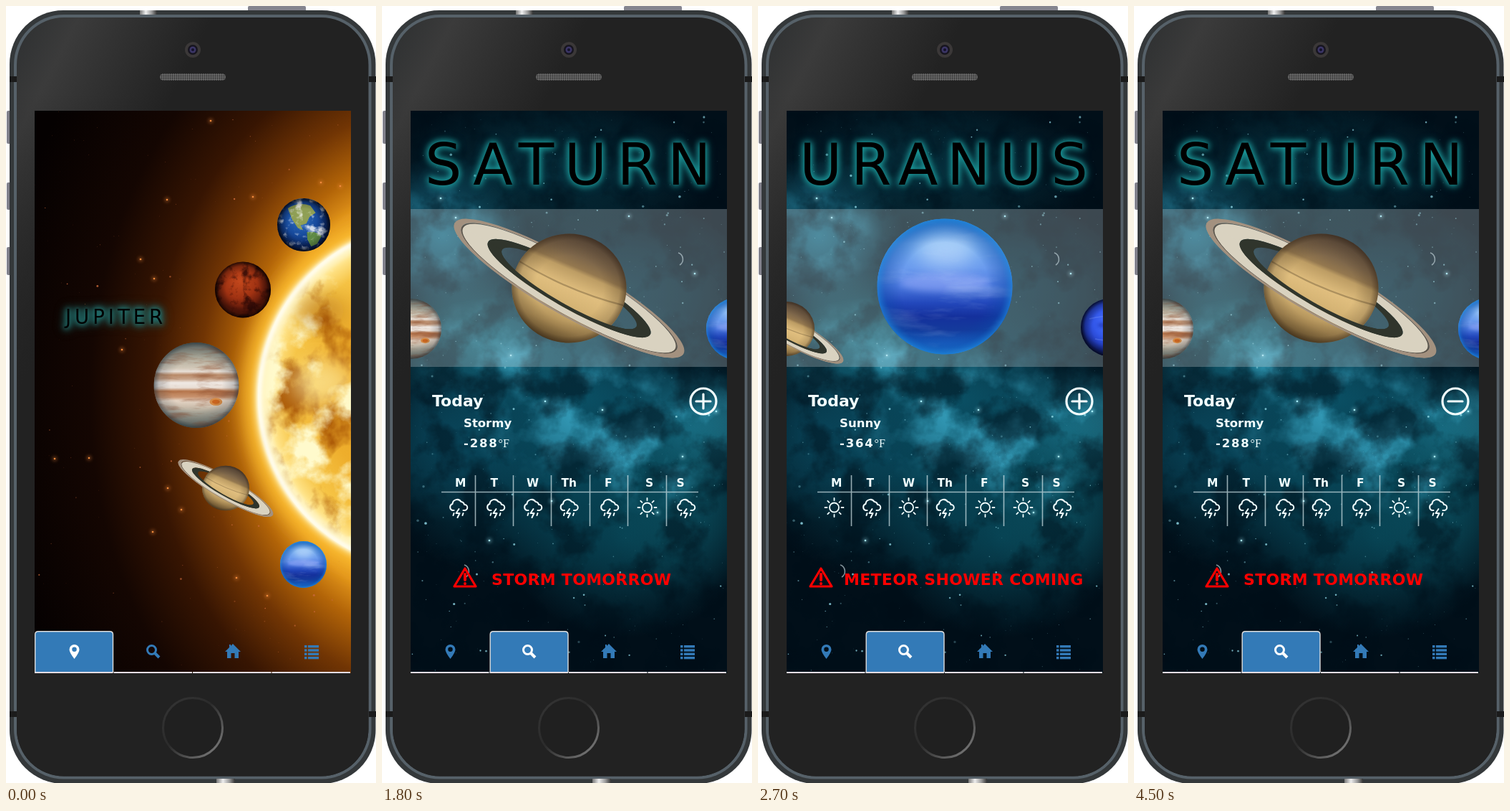
Animation of 517x1083 px, one loop 5.4 s. Source, as an HTML page:

```html
<!DOCTYPE html>
<html lang="en">
<head>
<meta charset="utf-8">
<title>Planet weather app</title>
<style>
  html, body { margin: 0; width: 100%; height: 100%; overflow: hidden; background: #fff; }
  svg { position: absolute; left: 0; top: 0; width: 517px; height: 1083px; }
  .layer { will-change: opacity; }
  text { font-family: "DejaVu Sans", sans-serif; fill: #f2ffff; white-space: pre; }
  .b { font-weight: bold; }
  .unit { font: 16px "Liberation Serif", serif; }
  .small { font-size: 27.5px; letter-spacing: 5px; fill: #000;
    filter: drop-shadow(0 0 3px #267f7c) drop-shadow(0 0 4px #1f6d6a) drop-shadow(0 0 6px #1c5d5b); }
  .large { font-size: 81px; fill: #000;
    filter: drop-shadow(0 0 5px #1fa3a3) drop-shadow(0 0 5px #137f83); }
  .alert { font-size: 22px; font-weight: bold; letter-spacing: .3px; fill: #f00; }
  .line { fill: none; stroke: #f2ffff; stroke-linecap: round; stroke-linejoin: round; }
</style>
</head>
<body>
<svg viewBox="0 0 517 1083" xmlns="http://www.w3.org/2000/svg">
  <defs id="defs"></defs>
  <g id="phone"></g>
</svg>
<div id="screen"></div>
<script>
const $ = id => document.getElementById(id);
const SLOTS = 6, LOOP = 5400;

let seed = 7;
const rnd = () => (seed = (seed * 16807) % 2147483647) / 2147483647;

// ---- gradients, filters ----
const stops = list => list.split(', ').map(s => {
  const [at, color, alpha = 1] = s.split(' ');
  return `<stop offset="${at}" stop-color="${color}" stop-opacity="${alpha}"/>`;
}).join('');
const lin = (id, list, attrs = 'x2="0" y2="1"') =>
  `<linearGradient id="${id}" ${attrs}>${stops(list)}</linearGradient>`;
const rad = (id, list, attrs = '') =>
  `<radialGradient id="${id}" ${attrs}>${stops(list)}</radialGradient>`;
const noise = (id, freq, rgb, gain, cut, n = 3) =>
  `<filter id="${id}" x="0" y="0" width="1" height="1" color-interpolation-filters="sRGB">
    <feTurbulence type="fractalNoise" baseFrequency="${freq}" numOctaves="5" seed="${n}"/>
    <feColorMatrix values="0 0 0 0 ${rgb[0]} 0 0 0 0 ${rgb[1]} 0 0 0 0 ${rgb[2]} ${gain} 0 0 0 ${-cut}"/>
  </filter>`;
const blur = (id, d) =>
  `<filter id="${id}" x="-.5" y="-.5" width="2" height="2"><feGaussianBlur stdDeviation="${d}"/></filter>`;

// ---- planets, drawn with a radius of 100 ----
const square = attrs => `<rect x="-100" y="-100" width="200" height="200" ${attrs}/>`;
const ball = (id, body, shade = 'shade') =>
  `<g id="${id}"><g clip-path="url(#ball)">${body}</g><circle r="100" fill="url(#${shade})"/></g>`;
const rings = [[223, 14, '#a3917f'], [214, 3, '#5d554b'], [188, 50, '#d9d2c0'], [149, 28, '#30352c']]
  .map(([r, w, c]) => `<circle r="${r}" stroke="${c}" stroke-width="${w}"/>`).join('');
const ringPlane = 'transform="rotate(29.7) scale(1 .205)" fill="none"';

$('defs').innerHTML =
  '<clipPath id="glass"><rect x="40" y="146" width="442" height="784"/></clipPath>' +
  '<clipPath id="ball"><circle r="100"/></clipPath>' +
  '<clipPath id="front"><rect x="-240" width="480" height="240"/></clipPath>' +
  '<clipPath id="disc"><circle cx="593" cy="545" r="241"/></clipPath>' +
  rad('shade', '.6 #000 0, .85 #000 .25, 1 #000 .75') +
  rad('soft', '.6 #123 0, .88 #123 .2, 1 #0a1c28 .55') +
  rad('dusk', '.6 #2a1c10 0, .88 #2a1c10 .18, 1 #2a1c10 .55') +
  rad('rim', '.65 #0a3c9c 0, .88 #0a4aa8 .4, 1 #1a7fd6 .8') +
  lin('jup', '0 #73766c, .15 #a7a595, .3 #d2c8b8, .34 #e8dfd6, .38 #b98a68, .43 #c9a68c, .47 #efe9e4, ' +
    '.53 #e9ded5, .57 #b6764c, .64 #c99470, .68 #e6d6c6, .75 #cdbfae, .82 #aaa698, 1 #6c7369') +
  lin('sat', '0 #5b4a3c, .2 #7d664a, .3 #94784f, .34 #bd9d64, .5 #e0be7e, .7 #d0af70, .85 #a98a54, 1 #6d5630') +
  lin('ura', '0 #2c86d8, .18 #6fabee, .36 #6a9bee, .5 #4a78de, .62 #2348bc, .72 #14309c, .82 #143a9c, .92 #1b62c4, 1 #1f78d0') +
  rad('nep', '0 #4a72ff, .5 #3358ea, .8 #2440c4, 1 #14247e', 'cx=".48" cy=".42"') +
  rad('ear', '0 #2f6fc0, .6 #174a9c, 1 #0a2560', 'cx=".45" cy=".4"') +
  rad('mar', '0 #c4481c, .6 #a03212, 1 #5c180a', 'cx=".45" cy=".35"') +
  noise('dark', '.025', [.16, .03, .02], 4, 1.9) +
  noise('cloud', '.025', [1, 1, 1], 4.5, 2.4, 8) +
  noise('streak', '.012 .07', [.55, .3, .18], 3.5, 1.7) +
  noise('wisp', '.01 .04', [.85, .92, 1], 3, 1.5, 5) +
  noise('flare', '.016 .013', [.68, .36, .03], 4.5, 2.1, 4) +
  noise('blaze', '.018', [1, .98, .8], 4.5, 2.25, 11) +
  noise('fog', '.014', [.24, .68, .8], 3.6, 1.6, 5) +
  noise('haze', '.018', [0, .05, .09], 4, 1.8, 14) +
  blur('b2', 2) + blur('b5', 5) + blur('b14', 14) +
  rad('glow', '0 #ffcf50, .38 #e2951a, .44 #b26408, .53 #713504, .64 #371502, .78 #140602, 1 #050101',
    'gradientUnits="userSpaceOnUse" cx="593" cy="436" r="610" gradientTransform="scale(1 1.25)"') +
  rad('sun', '0 #e39a1c, .6 #eeae2c, .82 #f6c445, .93 #ffe48a, 1 #fffbe0') +
  rad('spot', '0 #fff .9, .5 #fff .5, 1 #fff 0') +
  lin('shine', '0 #2e3031, .3 #3b3b3b, .6 #303030, 1 #222',
    'gradientUnits="userSpaceOnUse" x1="20" y1="20" x2="230" y2="130"') +
  lin('fade', '0 #222 0, 1 #222', 'gradientUnits="userSpaceOnUse" x1="0" y1="120" x2="0" y2="640"') +
  lin('metal', '0 #777, .35 #eee, .7 #999, 1 #333', '') +
  lin('home', '0 #353535, .45 #2b2b2b, 1 #858585', 'x2="1" y2="1"') +
  '<pattern id="mesh" width="3" height="3" patternUnits="userSpaceOnUse"><rect width="3" height="3" fill="#6a6a6a"/>' +
  '<circle cx="1.5" cy="1.5" r="1" fill="#2b2b2b"/></pattern>' +
  ball('jupiter', square('fill="url(#jup)"') + square('filter="url(#streak)" opacity=".45"') +
    '<ellipse cx="46" cy="39" rx="15" ry="9" fill="#d48a45"/><ellipse cx="46" cy="39" rx="9" ry="5" fill="#c8641f"/>', 'soft') +
  `<g id="saturn"><g ${ringPlane}>${rings}</g><g transform="scale(1 .95)">` +
  ball('globe', `<g transform="rotate(24)">${square('fill="url(#sat)"')}` +
    '<path d="M-100-10Q0 6 100-10" fill="none" stroke="#7d6740" stroke-width="3" opacity=".5"/></g>', 'dusk') +
  `</g><g ${ringPlane}><g clip-path="url(#front)">${rings}</g></g></g>` +
  ball('uranus', square('fill="url(#ura)"') +
    '<ellipse cx="2" cy="-56" rx="44" ry="28" fill="#cfe6ff" opacity=".6" filter="url(#b14)"/>' +
    '<ellipse cy="-6" rx="66" ry="14" fill="#a9b6ff" opacity=".45" filter="url(#b5)"/>' +
    square('filter="url(#wisp)" opacity=".2"'), 'rim') +
  ball('neptune', square('fill="url(#nep)"') +
    '<ellipse cx="-18" cy="-8" rx="24" ry="9" fill="#172fae" opacity=".6" filter="url(#b5)"/>' +
    '<path d="M-70-30Q0-48 60-30M-50 40Q0 52 70 30" fill="none" stroke="#86a4ff" stroke-width="4" opacity=".3"/>') +
  ball('earth', square('fill="url(#ear)"') +
    '<path d="M-60-62Q-20-88 25-72L45-45 22-30 10-5-12 2-2 20-22 12-44-20Z" fill="#8f9f55"/>' +
    '<path d="M12 28Q45 22 68 42L50 72 28 82 14 55Z" fill="#5f8a45"/>' + square('filter="url(#cloud)" opacity=".8"')) +
  ball('mars', square('fill="url(#mar)"') + square('filter="url(#dark)" opacity=".8"')) +
  '<g id="shower" class="line" stroke-width="2"><path d="M-6 4H-8A4.7 4.7 0 0 1-8-5A6.500 6.500 0 0 1 4-8A5 5 0 0 1 8.500-4A4 4 0 0 1 9 4H7"/>' +
  '<path d="M1 2-3 8H2L-1 14M-6 8-7 11M7 8 6 11"/></g>' +
  '<g id="clear" class="line" stroke-width="1.8"><circle r="6.5"/>' +
  [0, 45, 90, 135, 180, 225, 270, 315].map(a => `<path d="M0-10V-13" transform="rotate(${a})"/>`).join('') + '</g>' +
  '<g id="warn" fill="none" stroke="#f00" stroke-linejoin="round" stroke-linecap="round">' +
  '<path d="M0-13 15 12H-15Z" stroke-width="3.2"/><path d="M0-5V3M0 8V8.2" stroke-width="4"/></g>';

const put = (id, x, y, r = 100) => `<use href="#${id}" transform="translate(${x} ${y}) scale(${r / 100})"/>`;
const text = (x, y, s, attrs = '') => `<text x="${x}" y="${y}" ${attrs}>${s}</text>`;
const box = (x, y, w, h, fill, r = 0) =>
  `<rect x="${x}" y="${y}" width="${w}" height="${h}" rx="${r}" fill="${fill}"/>`;
const full = attrs => `<rect x="40" y="146" width="442" height="784" ${attrs}/>`;
const dots = (n, color, big) => Array.from({ length: n }, () => {
  const x = 40 + rnd() * 442, y = 146 + rnd() * 784, r = .35 + big * rnd() ** 5;
  return `<circle cx="${x.toFixed(1)}" cy="${y.toFixed(1)}" r="${r.toFixed(2)}" fill="${color}" opacity="${(.25 + rnd() * .6).toFixed(2)}"/>`;
}).join('');
const spark = (x, y, color) =>
  `<circle cx="${x}" cy="${y}" r="3.5" fill="${color}" opacity=".35" filter="url(#b2)"/><circle cx="${x}" cy="${y}" r="1.3" fill="${color}"/>`;

// ---- phone body ----
$('phone').innerHTML =
  box(338, 0, 81, 12, '#85858f', 2) +
  [[146, 46], [246, 38], [336, 39]].map(([y, h]) => box(1, y, 9, h, '#80808a', 2)).join('') +
  box(5, 6, 511.5, 1078, '#34383a', 75) + box(11, 12, 499.5, 1065.5, '#566169', 70) +
  box(15, 16, 491.5, 1057.5, 'url(#shine)', 66) + box(15, 16, 491.5, 1057.5, 'url(#fade)', 66) +
  [98, 983].map(y => box(5, y, 10, 8, '#1b1b1b') + box(507, y, 10, 8, '#1b1b1b')).join('') +
  box(187, 6, 24, 6, 'url(#metal)') + box(294, 1077, 26, 6, 'url(#metal)') +
  '<circle cx="261" cy="61" r="11" fill="#3b3838"/><circle cx="261" cy="61" r="7" fill="#17151f"/>' +
  '<circle cx="261" cy="61" r="4.5" fill="#3b3566"/><circle cx="261" cy="61" r="2" fill="#15132a"/>' +
  box(215, 94, 92, 10, 'url(#mesh)', 5) +
  '<circle cx="261" cy="1006" r="41.5" fill="#202020" stroke="url(#home)" stroke-width="3"/>';

// ---- screen layers ----
const sunPage = full('fill="url(#glow)"') + dots(170, '#c9683a', 1.2) +
  [[286, 160], [225, 270], [467, 251], [440, 246], [188, 353], [207, 380], [162, 479], [68, 631],
    [116, 630], [322, 797], [226, 672], [245, 702], [365, 822], [205, 733], [345, 266]]
    .map(([x, y]) => spark(x, y, '#f08a3c')).join('') +
  '<circle cx="593" cy="545" r="243" fill="none" stroke="#ffc133" stroke-width="34" filter="url(#b14)"/>' +
  '<circle cx="593" cy="545" r="241" fill="url(#sun)"/>' +
  '<g clip-path="url(#disc)"><rect x="340" y="300" width="142" height="490" filter="url(#flare)"/>' +
  '<rect x="340" y="300" width="142" height="490" filter="url(#blaze)"/>' +
  '<ellipse cx="440" cy="525" rx="42" ry="32" fill="#fff3b0" opacity=".6" filter="url(#b14)"/>' +
  '<ellipse cx="440" cy="425" rx="34" ry="22" fill="#a55f0c" opacity=".5" filter="url(#b14)"/></g>' +
  '<circle cx="593" cy="545" r="237" fill="none" stroke="#fff5c4" stroke-width="15" filter="url(#b5)"/>' +
  '<circle cx="593" cy="545" r="239" fill="none" stroke="#fffdf0" stroke-width="6" filter="url(#b2)"/>';

const clouds = [
  [85, 320, 120, 110, '#1f7f9c', .85], [160, 470, 170, 100, '#1b8298', .85], [430, 590, 130, 85, '#2f9fb8', .9],
  [280, 550, 250, 150, '#0c566c', .95], [330, 400, 200, 130, '#0b4356', .7], [240, 230, 230, 110, '#073644', .8],
  [250, 650, 270, 160, '#08495c', .85], [340, 740, 170, 140, '#08495a', .8], [430, 690, 120, 130, '#0c5464', .7],
  [90, 600, 130, 120, '#0a4a60', .8]
];
const blobs = clouds.map(([x, y, rx, ry, c, a], i) =>
  rad('n' + i, `0 ${c} ${a}, .5 ${c} ${a * .6}, 1 ${c} 0`) +
  `<ellipse cx="${x}" cy="${y}" rx="${rx}" ry="${ry}" fill="url(#n${i})"/>`).join('');
const spots = [[85, 315, 90, 80], [165, 475, 140, 70], [430, 585, 110, 60], [370, 650, 110, 60], [290, 570, 180, 110]]
  .map(([x, y, rx, ry]) => `<ellipse cx="${x}" cy="${y}" rx="${rx}" ry="${ry}" fill="url(#spot)"/>`).join('');
const crescent = (x, y) =>
  `<path d="M${x} ${y - 9}A9.500 9.500 0 0 1 ${x + 2} ${y + 8}" fill="none" stroke="#b9cbd0" stroke-width="1.6" opacity=".7"/>`;
const days = [['M', 102], ['T', 151.5], ['W', 202], ['Th', 250.5], ['F', 311], ['S', 368], ['S', 411.5]];
const grid = 'M83 677.5H442' + [130, 183, 236, 290, 343, 397].map(x => `M${x}.5 654V725`).join('');

const skyPage = full('fill="#010f19"') + blobs +
  `<mask id="where">${spots}</mask><g mask="url(#where)">${full('filter="url(#fog)"')}</g>` +
  full('filter="url(#haze)" opacity=".5"') + dots(420, '#8fd6e4', 1.5) +
  [[82, 268], [103, 295], [228, 551], [308, 563], [437, 373], [150, 745], [467, 565], [180, 487], [420, 628], [345, 293], [385, 706], [237, 690]]
    .map(([x, y]) => spark(x, y, '#a8f0ff')).join('') +
  '<rect x="40" y="283" width="442" height="220" fill="#c8ccd0" opacity=".3"/>' +
  crescent(414, 353) + crescent(115, 788) +
  text(70, 558, 'Today', 'class="b" font-size="22"') +
  `<path d="${grid}" stroke="#d5e6ea" stroke-width="1.6" opacity=".7"/>` +
  days.map(([d, x]) => text(x, 670, d, 'class="b" font-size="15.5"')).join('') +
  '<g class="line" stroke-width="3.2"><circle cx="449" cy="551" r="18"/><path d="M439 551H459"/></g>';

const forecast = (sky, temp, icons) =>
  text(114, 587, sky, 'class="b" font-size="16.5"') +
  text(114, 615, `<tspan letter-spacing="1.8">${temp}</tspan><tspan class="unit">°F</tspan>`, 'class="b" font-size="16.5"') +
  [...icons].map((c, i) => put(c === 's' ? 'clear' : 'shower', [106.5, 158.5, 210.5, 261, 317.5, 370.5, 424.5][i], 699)).join('');

const saturnPage = text(60, 249, 'SATURN', 'class="large" letter-spacing="14.4"') +
  put('jupiter', 41, 450, 42) + put('uranus', 496, 450, 43) + put('saturn', 261.5, 393.5, 80) +
  forecast('Stormy', '-288', 'rrrrrsr') +
  put('warn', 116, 797) + text(153, 807, 'STORM TOMORROW', 'class="alert"');

const uranusPage = text(58, 249, 'URANUS', 'class="large" letter-spacing="12.8"') +
  put('saturn', 39, 450, 40) + put('neptune', 491, 448, 40) + put('uranus', 261, 391, 94.5) +
  forecast('Sunny', '-364', 'srsrssr') +
  put('warn', 88, 797) + text(120, 807, 'METEOR SHOWER COMING', 'class="alert"');

const orbit = (name, x, list) => text(x, 443, name, 'class="small"') + list.map(p => put(...p)).join('');

// ---- tab bar ----
const glyphs = [
  '<path fill-rule="evenodd" d="M95.5 910Q88.5 901 88.5 897A7 7 0 0 1 102.5 897Q102.5 901 95.5 910ZM95.5 893.5A3.2 3.2 0 1 0 95.5 900A3.2 3.2 0 1 0 95.5 893.5Z"/>',
  '<g fill="none" stroke="currentColor"><circle cx="203.500" cy="897.5" r="6" stroke-width="3"/><path d="M208 902 214 908" stroke-width="4"/></g>',
  '<path d="M317 889 328 900H325V909H319.5V902H314.5V909H309V900H306L312 894V890H314V892Z"/>',
  [891, 896.3, 901.6, 906.9].map(y => box(417, y, 3.5, 3.4, 'currentColor') + box(422, y, 15, 3.4, 'currentColor')).join('')
];
const tabs = active => glyphs.map((g, i) => {
  const x = 40 + i * 110.5, on = i === active;
  const back = on
    ? `<path d="M${x + .7} 929V876Q${x + .7} 871.7 ${x + 5} 871.7H${x + 105}Q${x + 109.5} 871.7 ${x + 109.5} 876V929" fill="#337ab7" stroke="#ddd" stroke-width="1.4"/>`
    : '';
  return back + box(x, 928, 109.5, 2, '#e4dde4') +
    `<g style="color:${on ? '#fff' : '#337ab7'}" fill="currentColor">${g}</g>`;
}).join('');

// Each layer with the slots of the loop in which it shows
const layers = [
  ['110000', sunPage + tabs(0)],
  ['100000', orbit('JUPITER', 83, [['earth', 416, 305, 37], ['mars', 331, 395.5, 39], ['jupiter', 266, 528.5, 59.5],
    ['saturn', 307, 672, 33], ['uranus', 415.5, 778.5, 32.5]])],
  ['010000', orbit('SATURN', 80, [['mars', 416, 306, 34.5], ['jupiter', 332, 395.5, 40], ['saturn', 267.5, 528, 55],
    ['uranus', 308, 672, 32.5], ['neptune', 415, 779, 32]])],
  ['001111', skyPage + tabs(1)],
  ['001011', saturnPage],
  ['000100', uranusPage],
  ['001110', '<path class="line" d="M449 541V561" stroke-width="3.2"/>']
];

$('screen').innerHTML = layers.map(([, art]) =>
  `<svg class="layer" viewBox="0 0 517 1083"><g clip-path="url(#glass)">${art}</g></svg>`).join('');

// All layers share one start time, so they always switch together
const start = document.timeline.currentTime ?? 0;
layers.forEach(([plan], i) => {
  const steps = [...plan, plan[0]].map((on, k) => ({ opacity: +on, offset: k / SLOTS, easing: 'steps(1)' }));
  $('screen').children[i].animate(steps, { duration: LOOP, iterations: Infinity }).startTime = start;
});
</script>
</body>
</html>
```
